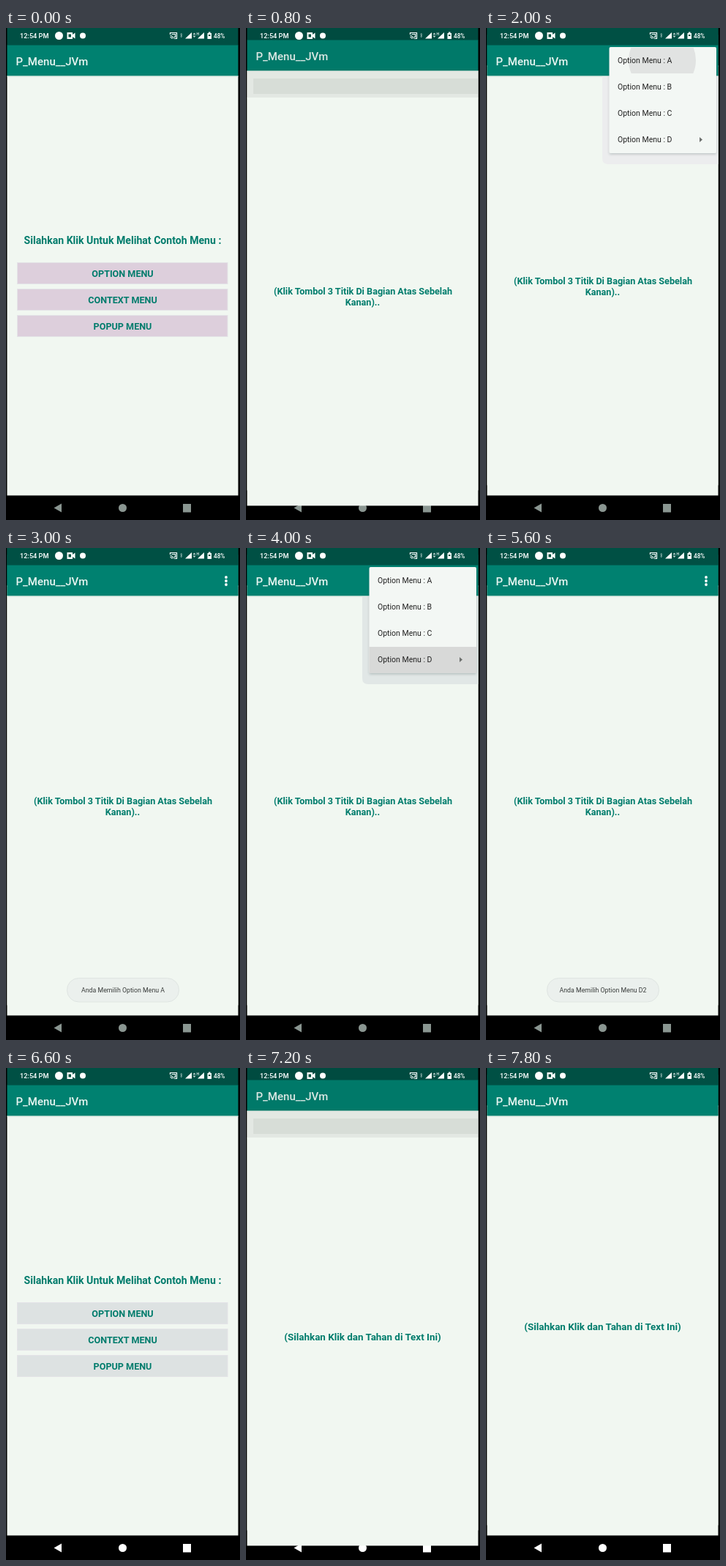
Animation, 320 px wide and 672 px high, one loop 8 s. Source, as an HTML page:

```html
<!DOCTYPE html>
<html lang="id">
<head>
<meta charset="utf-8">
<title>Menu demo</title>
<style>
html, body { margin: 0; width: 100%; height: 100%; overflow: hidden; background: #000; }
svg { display: block; width: 320px; height: 672px; font-family: Roboto, sans-serif; }
.mid { text-anchor: middle; }
.bold { font-weight: 700; fill: #007c6c; }
.title { font-size: 15px; font-weight: 500; fill: #eaf6f2; }
.item { font-size: 10.5px; fill: #222; }
.dim { fill: #7d827f; }
.toast { font-size: 8.8px; fill: #3a3d3c; }
.status { font-weight: 500; fill: #fff; }
</style>
</head>
<body>
<svg viewBox="0 0 320 672">
  <defs>
    <filter id="shadow" x="-10%" y="-10%" width="120%" height="125%">
      <feDropShadow dx="0" dy="1.500" stdDeviation="1.500" flood-color="#344" flood-opacity=".25"/>
    </filter>
    <clipPath id="optionClip"><rect width="320" height="672"/></clipPath>
    <clipPath id="contextClip"><rect width="320" height="672"/></clipPath>
    <clipPath id="rowClip"><rect x="169" y="27" width="146" height="35"/></clipPath>
  </defs>
  <rect width="320" height="672"/>
  <g id="nav">
    <path d="M65.500 655.500L76 649.500V661.500Z"/>
    <circle cx="159.500" cy="655.500" r="5.500"/>
    <rect x="242" y="650" width="11" height="11.500"/>
  </g>
  <g id="main"></g>
  <g id="shade">
    <rect x="1.500" y="0" width="316" height="59" opacity=".06"/>
    <rect x="1.500" y="59" width="316" height="36.500" fill="#e3e8e3"/>
    <rect x="10" y="69" width="307" height="21" fill="#d7ddd7"/>
  </g>
  <g clip-path="url(#optionClip)"><g id="option"></g></g>
  <g clip-path="url(#contextClip)"><g id="context"></g></g>
  <path id="halo" d="M159 66H317.500V186H167Q159 186 159 178Z"/>
  <g id="menu"></g>
  <g id="submenu"></g>
  <g id="toast">
    <rect x="83.500" y="587.500" width="153" height="32.500" rx="16" fill="#ebf0ed" stroke="#dfe5e2"/>
    <text class="toast mid" x="160" y="607"></text>
  </g>
  <g id="status" fill="#fff">
    <text class="status" x="19" y="13.500" font-size="9.2">12:54 PM</text>
    <circle cx="72.500" cy="10.500" r="5.500"/>
    <path d="M83.500 6H91V9L94.500 6.500V14.500L91 12V15H83.500Z"/>
    <path d="M85.500 8.500h3.500v4h-3.500z" fill="#00503f"/>
    <circle cx="105" cy="10.500" r="4"/>
    <g fill="none" stroke="#fff" stroke-width="1.200">
      <path d="M224.500 9V6.500H233.500V14.500H230M224.500 10.500a4 4 0 0 1 4 4M224.500 12.500a2 2 0 0 1 2 2"/>
      <path d="M226.500 8.500h5v4h-2"/>
      <path d="M238.500 8l2.500 3l-1.500 2V7l1.500 1.500l-2.500 3" stroke-width=".7" opacity=".5"/>
    </g>
    <path d="M245 14.500L254 6V14.500ZM262 14.500L271 6V14.500Z"/>
    <path d="M255.500 9l2-2.500l2 2.500zM255.500 10.500h4l-2 2.500z" opacity=".75"/>
    <text class="status" x="260.500" y="9.500" font-size="5">H</text>
    <path d="M275.500 7h1.500V5.500h2.500V7H281V15h-5.500z"/>
    <path d="M277 9h2.500v2H277z" fill="#00503f"/>
    <text class="status" x="284" y="13.500" font-size="8.2">48%</text>
  </g>
</svg>
<script>
const LOOP = 8000, STEP = 200;
const $ = id => document.getElementById(id);
const rect = (x, y, w, h, fill, more = '') =>
  `<rect x="${x}" y="${y}" width="${w}" height="${h}" fill="${fill}" ${more}/>`;
const text = (x, y, cls, str, size = '') =>
  `<text x="${x}" y="${y}" class="${cls}"${size && ` font-size="${size}"`}>${str}</text>`;
const dots = [40, 45, 50].map(y => `<circle cx="301" cy="${y}" r="1.900" fill="#fff"/>`).join('');

const page = body =>
  rect(1.5, 0, 316, 24, '#005044') + rect(1.5, 65, 316, 573.5, '#f1f7f1') +
  rect(1.5, 23.5, 316, 42, '#008170') + rect(1.5, 65.5, 316, 1, '#cfdfd8') +
  text(13.5, 50.5, 'title', 'P_Menu__JVm') + body;

const button = (label, i) =>
  rect(15.5, 320.5 + 36 * i, 287.5, 29, '#ddcfdc', 'class="btn" stroke="#e3e3e7"') +
  text(159.5, 339.7 + 36 * i, 'bold mid', label, 12.6);

const popup = rows => rect(168.5, 26, 146.5, 36 * rows + 1, '#f3f7f4', 'rx="2" filter="url(#shadow)"');
const item = (label, i, cls = '') => text(180, 48.3 + 36 * i, 'item ' + cls, 'Option Menu : ' + label);

$('main').innerHTML = page(
  text(159.5, 295, 'bold mid', 'Silahkan Klik Untuk Melihat Contoh Menu :', 14.1) +
  ['OPTION MENU', 'CONTEXT MENU', 'POPUP MENU'].map(button).join(''));
$('option').innerHTML = page(dots +
  text(160, 350, 'bold mid', '(Klik Tombol 3 Titik Di Bagian Atas Sebelah', 12.6) +
  text(159.5, 365, 'bold mid', 'Kanan)..', 12.6));
$('context').innerHTML = page(
  text(159.5, 357.5, 'bold mid', '(Silahkan Klik dan Tahan di Text Ini)', 13.4));
$('menu').innerHTML = popup(4) +
  '<circle id="ripple" cx="241" cy="44" r="46" fill="#e1e3e2" clip-path="url(#rowClip)"/>' +
  rect(168.5, 135, 146.5, 36, '#d8d9d8', 'id="pressed"') +
  ['A', 'B', 'C', 'D'].map((s, i) => item(s, i)).join('') +
  '<path d="M292 149L296 152.500L292 156Z" fill="#6d706e"/>';
$('submenu').innerHTML = popup(3) +
  rect(168.5, 99, 146.5, 36, '#d8d9d8', 'id="subPressed"') +
  item('D', 0, 'dim') + item('D1', 1) + item('D2', 2);

const buttons = document.querySelectorAll('.btn');
const ramp = (t, from, span) => Math.min(1, Math.max(0, (t - from) / span));
const show = (id, on) => $(id).style.display = on ? '' : 'none';
const during = (t, ...spans) => spans.some(([a, b]) => t >= a && t < b);

// The incoming window rises while its clip uncovers it from the bottom.
function reveal(id, p) {
  show(id, p > 0);
  $(id).setAttribute('transform', `translate(0 ${28 * (1 - p)})`);
  $(id + 'Clip').firstElementChild.setAttribute('y', 653 * (1 - p) ** 2.78);
}

function render(now) {
  const t = Math.floor(now % LOOP / STEP) * STEP;
  const option = ramp(t, 600, 400) - ramp(t, 6000, 400);
  const context = ramp(t, 7000, 400);
  const moving = Math.max(option, context);
  reveal('option', option);
  reveal('context', context);
  $('main').setAttribute('transform', `translate(0 ${-14 * moving})`);
  show('shade', moving > 0 && moving < 1);

  const menuOpen = during(t, [1600, 2200], [3600, 4400]);
  show('menu', menuOpen);
  show('ripple', during(t, [2000, 2200]));
  show('pressed', during(t, [4000, 4400]));
  show('submenu', during(t, [4400, 5000]));
  show('subPressed', during(t, [4800, 5000]));
  show('halo', menuOpen);
  $('halo').setAttribute('fill', t < 3000 ? '#ecedee' : '#e1e7e6');

  show('toast', during(t, [2200, 3600], [5000, 6200]));
  $('toast').lastElementChild.textContent = 'Anda Memilih Option Menu ' + (t < 4000 ? 'A' : 'D2');
  $('nav').setAttribute('fill', t < 6200 ? '#8a9691' : '#fff');
  buttons.forEach((b, i) => {
    const down = i === 0 && during(t, [400, 800]) || i === 1 && during(t, [6800, 7200]);
    b.setAttribute('fill', down ? '#c9c3ca' : during(t, [6200, 6800]) ? '#dde2e2' : '#ddcfdc');
  });
}

const start = performance.now();
(function tick() {
  render(performance.now() - start);
  requestAnimationFrame(tick);
})();
</script>
</body>
</html>
```
